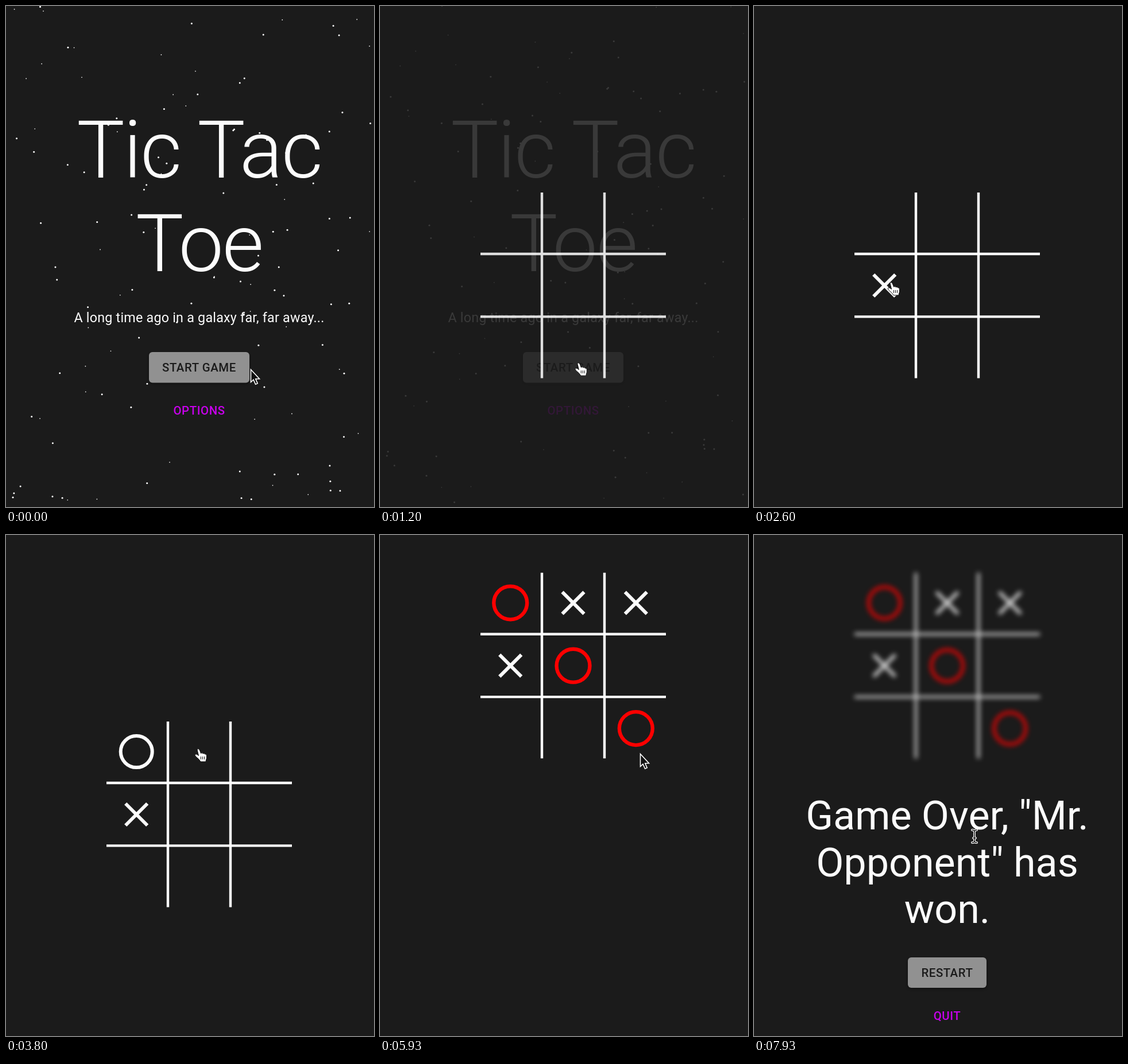
These frames come from a looping animation (641 px wide and 873 px high, 8 s). An HTML page:

```html
<!DOCTYPE html>
<html lang="en">
<head>
<meta charset="utf-8">
<title>Tic Tac Toe</title>
<style>
  html, body { margin: 0; width: 100%; height: 100%; overflow: hidden; background: #1b1b1b; }
  svg { display: block; width: 641px; height: 873px; }
  text { font-family: Roboto, sans-serif; text-anchor: middle; fill: #fcfcfc; }
  .title { font-size: 140px; font-weight: 300; letter-spacing: -.01562em; }
  .lead { font-size: 23.3px; letter-spacing: .00938em; }
  .result { font-size: 70px; }
  .label { font-size: 20.4px; font-weight: 500; letter-spacing: .02857em; }
  .dark { fill: #1b1b1b; }
  .link { fill: #c800ec; }
  .btn { fill: #919191; filter: drop-shadow(0 2px 2px rgba(0, 0, 0, .35)); }
  .stars { fill: #fff; }
  .lines { fill: none; stroke: #fcfcfc; stroke-width: 4.4; }
  .mark { fill: none; stroke: #fcfcfc; stroke-width: 6; }
</style>
</head>
<body>
<svg viewBox="0 0 641 873">
  <defs>
    <path id="ibeam" d="M-4-11Q0-11 0-8V8Q0 11-4 11M4-11Q0-11 0-8V8Q0 11 4 11M-2 3H2"/>
  </defs>
  <g id="menu">
    <g id="sky" class="stars"></g>
    <text class="title" x="336.5" y="298.5">Tic Tac</text>
    <text class="title" x="336.5" y="461.5">Toe</text>
    <text class="lead" x="336.5" y="550.5">A long time ago in a galaxy far, far away...</text>
    <rect class="btn" x="249" y="603" width="175" height="53.5" rx="6"/>
    <text class="label dark" x="336.5" y="637">START GAME</text>
    <text class="label link" x="336.5" y="712">OPTIONS</text>
  </g>
  <g id="board">
    <path class="lines" d="M282 325V648.500M391 325V648.500M175 432H498M175 541.400H498"/>
    <g id="marks"></g>
  </g>
  <g id="over">
    <text class="result" x="336.5" y="512.5">Game Over, "Mr.</text>
    <text class="result" x="336.5" y="594.5">Opponent" has</text>
    <text class="result" x="336.5" y="676">won.</text>
    <rect class="btn" x="268" y="736" width="137" height="53" rx="6"/>
    <text class="label dark" x="336.5" y="769.5">RESTART</text>
    <text class="label link" x="336.5" y="844.5">QUIT</text>
  </g>
  <g id="cursor">
    <path id="arrow" d="M.5 .5V22.500L5 18.200L8.600 26.300L12.200 24.700L8.800 16.800H15.500Z"
      fill="#111" stroke="#fff" stroke-width="1.6"/>
    <g id="hand" stroke="#111" stroke-linejoin="round">
      <path fill="#fff" d="M-1 1Q0-2 3 1L5.500 7.500Q8 5.500 9 8Q11.500 6.500 12.500 9Q15 8 15.500 11
        V16Q14.500 18 14 22H5Q3 18-3.500 13Q-6 10-4 9Q-2 8 1.500 11.500Z"/>
      <path fill="none" d="M5.500 13V18M8.500 13V18M11.500 13V18"/>
    </g>
    <g id="beam" fill="none" stroke-linecap="round">
      <use href="#ibeam" stroke="#fff" stroke-width="4"/>
      <use href="#ibeam" stroke="#111" stroke-width="1.5"/>
    </g>
  </g>
</svg>
<script>
const LOOP = 8000, WIN = 5600, REPLY = 330;
const $ = id => document.getElementById(id);
const clamp = v => Math.min(1, Math.max(0, v));
const smooth = p => p * p * (3 - 2 * p);
const show = (el, on) => { el.style.display = on ? '' : 'none'; };

function add(parent, tag, attrs) {
  const el = document.createElementNS('http://www.w3.org/2000/svg', tag);
  for (const k in attrs) el.setAttribute(k, attrs[k]);
  parent.append(el);
  return el;
}

// Same curve as CSS "ease", solved by bisection
function ease(p) {
  p = clamp(p);
  let lo = 0, hi = 1, u = p;
  for (let i = 0; i < 20; i++) {
    u = (lo + hi) / 2;
    if (.75 * u * (1 - u) + u ** 3 < p) lo = u; else hi = u;
  }
  return .3 * u * (1 - u) ** 2 + 3 * u * u * (1 - u) + u ** 3;
}

let seed = 7;
function random() {
  seed = (seed * 16807) % 2147483647;
  return seed / 2147483647;
}

function starLayer(count, radius, speed) {
  const g = add($('sky'), 'g', {});
  for (let i = 0; i < count; i++) {
    add(g, 'circle', { cx: 12 + random() * 625, cy: random() * 930, r: radius });
  }
  return { g, speed };
}
const layers = [starLayer(60, 1.5, 60.5), starLayer(28, 1.5, 30.2), starLayer(44, .85, 18.3)];

function addMark(at, kind, [col, row]) {
  const el = kind === 'x'
    ? add($('marks'), 'path', { d: 'M-19-19L19 19M19-19L-19 19' })
    : add($('marks'), 'circle', { r: 27.5 });
  el.setAttribute('class', 'mark');
  const pos = `translate(${227.2 + col * 109.3} ${377.6 + row * 109.4})`;
  return { at, kind, pos, el };
}

// Each round: time, player's cell, computer's cell
const marks = [
  [2600, [0, 1], [0, 0]],
  [3870, [1, 0], [1, 1]],
  [5270, [2, 0], [2, 2]]
].flatMap(([at, x, o]) => [addMark(at, 'x', x), addMark(at + REPLY, 'o', o)]);

// Pointer moves: begin, end, destination
const moves = [
  [0, 700, 372, 623], [930, 1300, 339, 622], [1770, 2400, 238, 482], [3200, 3530, 334, 373],
  [4470, 4800, 405, 488], [4800, 5070, 453, 381], [7270, 7930, 384, 525]
];

function pointer(t) {
  let x = 426, y = 633;
  for (const [from, to, toX, toY] of moves) {
    const p = smooth(clamp((t - from) / (to - from)));
    x += (toX - x) * p;
    y += (toY - y) * p;
  }
  return [x, y];
}

function drawBoard(t, enter, fade) {
  const board = $('board');
  board.style.opacity = enter * (1 - .2 * fade);
  board.style.filter = fade > 0 ? `blur(${4.1 * fade}px)` : 'none';
  board.setAttribute('transform', `translate(0 ${t >= WIN ? -259.3 : 0})`);

  const red = clamp((t - WIN) / 250);
  const pulse = 1 + .055 * Math.sin(Math.PI * clamp((t - WIN) / 800));
  const rest = 252 * (1 - red);
  for (const { at, kind, pos, el } of marks) {
    const ring = kind === 'o';
    show(el, t >= at);
    el.setAttribute('transform', `${pos} scale(${ring ? pulse : 1})`);
    if (ring) el.style.stroke = `rgb(${252 + 3 * red}, ${rest}, ${rest})`;
  }
}

function drawCursor(t) {
  const [x, y] = pointer(t);
  $('cursor').setAttribute('transform', `translate(${x} ${y})`);
  const beam = t > WIN && y > 458;
  const hand = t > 200 && t < WIN;
  show($('beam'), beam);
  show($('hand'), hand);
  show($('arrow'), !beam && !hand);
}

function draw(t) {
  const enter = ease((t - 880) / 560);
  const fade = ease((t - 6460) / 900);
  for (const { g, speed } of layers) g.setAttribute('transform', `translate(0 ${-speed * t / 1000})`);
  $('menu').style.opacity = 1 - enter;
  show($('menu'), enter < 1);
  $('over').style.opacity = fade;
  show($('over'), fade > 0);
  drawBoard(t, enter, fade);
  drawCursor(t);
}

const start = performance.now();
function tick() {
  draw((performance.now() - start) % LOOP);
  requestAnimationFrame(tick);
}
draw(0);
requestAnimationFrame(tick);
</script>
</body>
</html>
```
